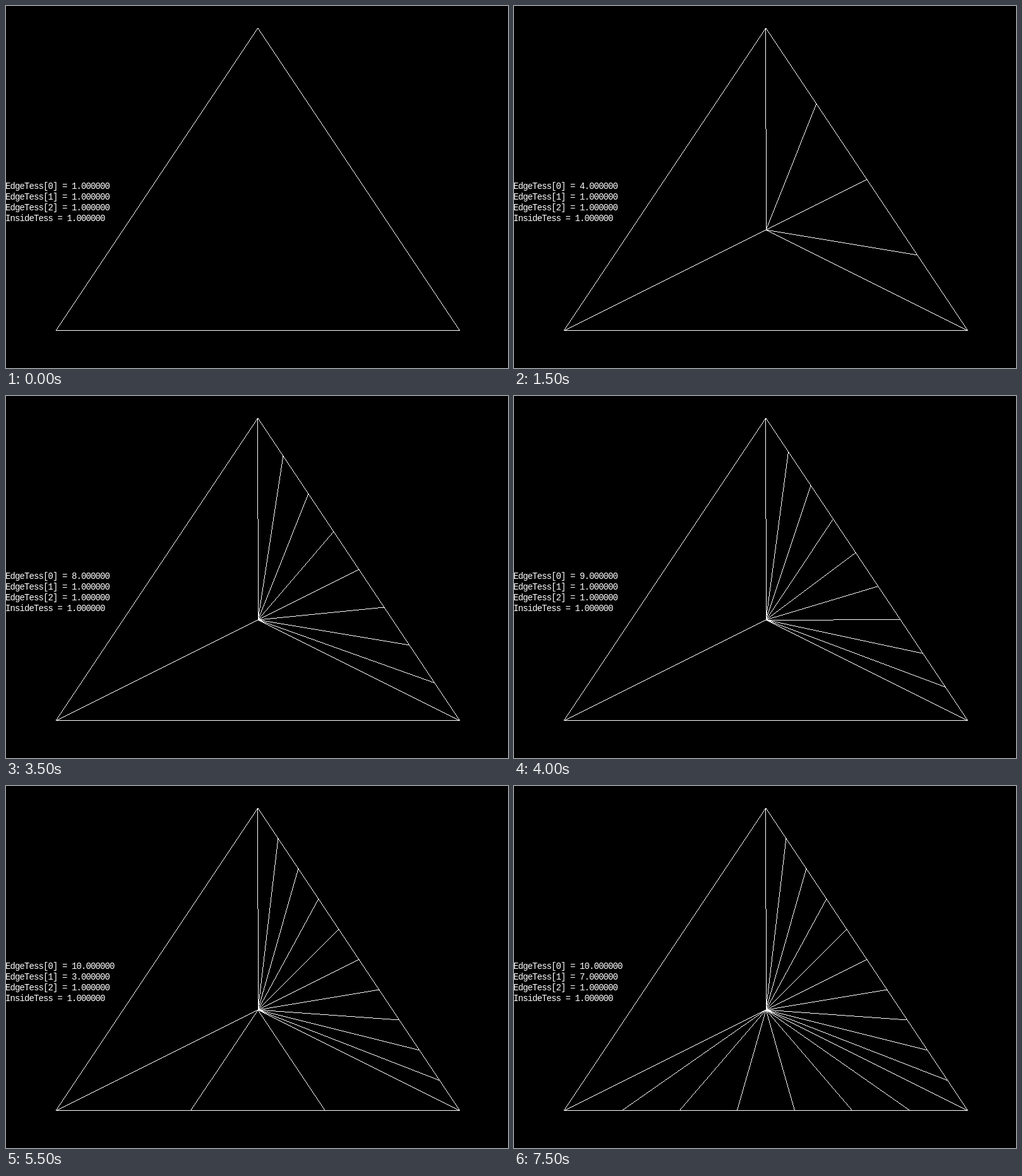
An HTML page with a canvas for the animation above (8000 ms loop, 795 px wide and 574 px high).

```html
<!DOCTYPE html>
<html lang="en">
<head>
<meta charset="utf-8">
<title>Triangle tessellation</title>
<style>
  html, body { margin: 0; width: 100%; height: 100%; overflow: hidden; background: #000; }
  canvas { position: absolute; left: 0; top: 0; }
  pre {
    position: absolute; left: -1px; top: 278px; margin: 0;
    color: #fff; font: 14px/17px "Liberation Mono", monospace; letter-spacing: -0.9px;
  }
</style>
</head>
<body>
<canvas id="stage" width="795" height="574"></canvas>
<pre id="info"></pre>
<script>
const LOOP = 8000, STEP = 500;
const EPS = 1 / 256; // subpixel grid of the rasterizer
const TOP = [399, 35], RIGHT = [719, 515], LEFT = [79, 515];
const CENTER = [399 + EPS, 355 + EPS];
const ctx = document.getElementById('stage').getContext('2d');
const info = document.getElementById('info');
ctx.fillStyle = '#fff';

// Pixel that holds a coordinate; one on a boundary belongs to the lower pixel
const pixel = v => Math.ceil(v - EPS / 2) - 1;

// One-pixel line without antialiasing, sampled at pixel centers of its longer axis
function line(a, b) {
  const main = Math.abs(b[0] - a[0]) > Math.abs(b[1] - a[1]) ? 0 : 1;
  const side = 1 - main;
  if (a[main] > b[main]) [a, b] = [b, a];
  const slope = (b[side] - a[side]) / (b[main] - a[main]);
  for (let i = Math.round(a[main]); i + 0.5 < b[main]; i++) {
    const j = pixel(a[side] + (i + 0.5 - a[main]) * slope);
    ctx.fillRect(main ? j : i, main ? i : j, 1, 1);
  }
}

// Lines from the center to the points that split an edge into equal parts
function fan(a, b, parts) {
  for (let k = 0; k <= parts; k++) {
    line(CENTER, a.map((v, i) => v + (b[i] - v) * k / parts));
  }
}

function draw(step) {
  const edges = [Math.min(step + 1, 10), Math.max(step - 8, 1), 1];
  const corners = [TOP, RIGHT, LEFT];
  ctx.clearRect(0, 0, 795, 574);
  corners.forEach((p, i) => {
    const q = corners[(i + 1) % 3];
    line(p, q);
    if (step > 0) fan(p, q, edges[i]);
  });
  info.textContent = edges.map((v, i) => `EdgeTess[${i}] = ${v.toFixed(6)}\n`).join('')
    + 'InsideTess = 1.000000';
}

let shown = -1;
function tick() {
  const step = Math.floor(performance.now() % LOOP / STEP);
  if (step !== shown) draw(shown = step);
  requestAnimationFrame(tick);
}
tick();
</script>
</body>
</html>
```
